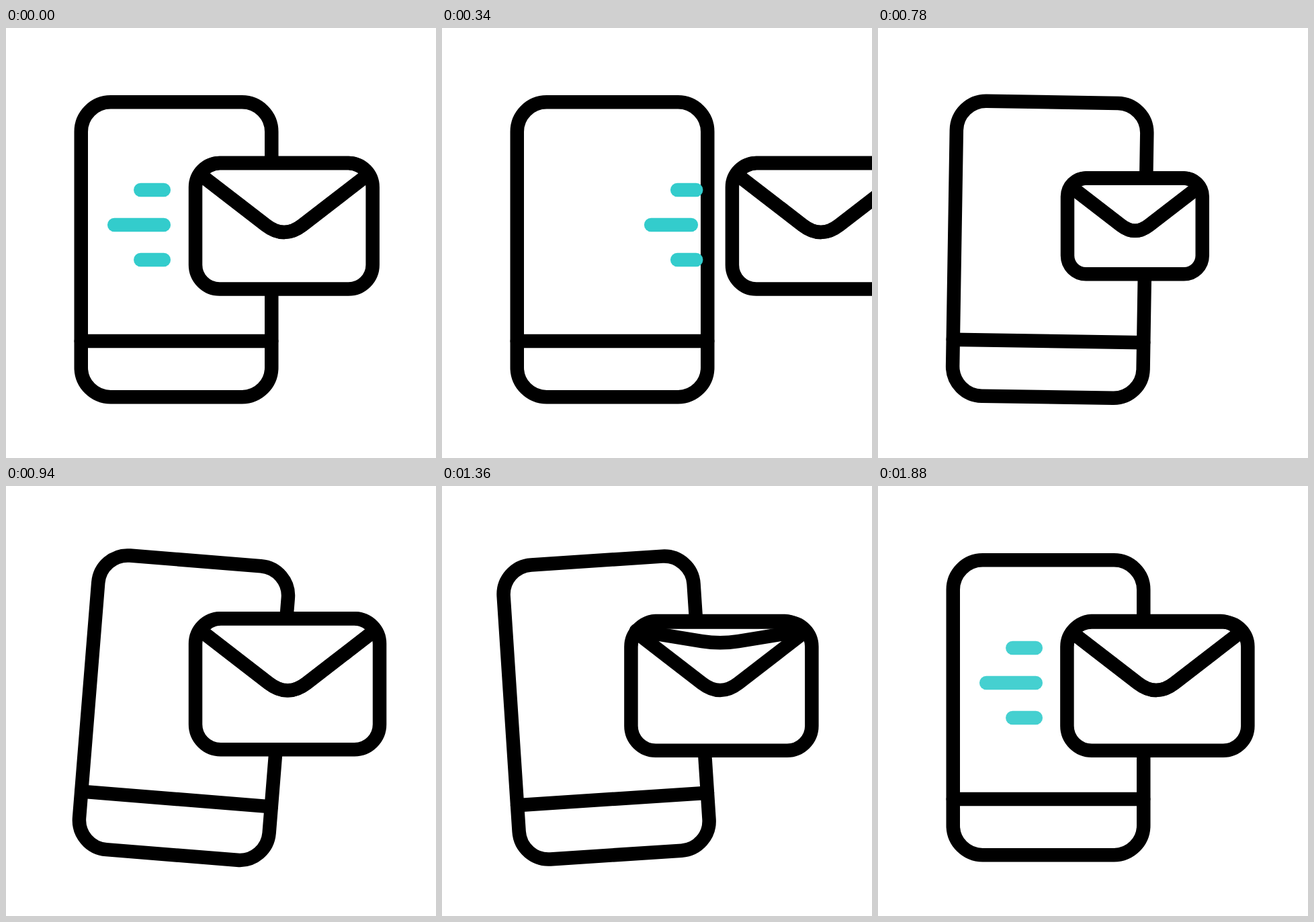
An HTML page for the animation above (2020 ms loop, 640 by 640 pixels).

```html
<!DOCTYPE html>
<html lang="en">
<head>
<meta charset="utf-8">
<title>Phone message</title>
<style>
  html, body { margin: 0; width: 100%; height: 100%; overflow: hidden; background: #fff; }
  svg { display: block; width: 640px; height: 640px; }
  svg * { vector-effect: non-scaling-stroke; }
  .ink { fill: none; stroke: #000; stroke-width: 20.5; stroke-linecap: round; stroke-linejoin: round; }
  .paper { fill: #fff; }
  #lines { stroke: #3cc; stroke-width: 20.5; stroke-linecap: round; }
</style>
</head>
<body>
<svg viewBox="0 0 640 640">
  <g id="phone" class="ink">
    <rect x="111.75" y="110.25" width="283.5" height="439" rx="44"/>
    <path d="M111.75 466H395.25"/>
  </g>
  <g id="lines">
    <line y1="241" y2="241"/>
    <line y1="293" y2="293"/>
    <line y1="345" y2="345"/>
  </g>
  <g id="mail" class="ink">
    <rect id="body" class="paper" x="282" y="201" width="263.7" height="187.6" rx="36"/>
    <path d="M289 218A36 36 0 0 1 318 201H510A36 36 0 0 1 539 218"/>
    <path d="M289 218L387 293.6Q414 314.4 441 293.6L539 218"/>
    <path id="lid" d="M289 218L387 293.6Q414 314.4 441 293.6L539 218"/>
  </g>
</svg>
<script>
  const LOOP = 2020, STEP = 20;
  const el = id => document.getElementById(id);
  const phone = el('phone'), lines = el('lines'), mail = el('mail');
  const body = el('body'), lid = el('lid');
  const starts = [200.3, 161.2, 200.3], lineEnd = 234.8;

  const clamp = v => Math.min(1, Math.max(0, v));
  const smooth = p => p * p * (3 - 2 * p);
  const easeOut = p => 1 - (1 - p) * (1 - p);

  // keys: [time, value], eased in and out between neighbours
  function track(keys, t) {
    let i = 1;
    while (i < keys.length - 1 && t > keys[i][0]) i++;
    const [t0, v0] = keys[i - 1], [t1, v1] = keys[i];
    return v0 + (v1 - v0) * smooth(clamp((t - t0) / (t1 - t0)));
  }

  const tilt = [[700, 0], [990, 5], [1200, -5], [1690, 0]];
  const lidScale = [[985, 1], [1295, 0.1], [1594, 1]];
  const settle = [[880, 1.053], [1060, 1]];
  const grow = [[940, 0], [1060, 1]];

  const scaleAt = (x, y, sx, sy) =>
    `translate(${x} ${y}) scale(${sx} ${sy}) translate(${-x} ${-y})`;

  function draw(t) {
    const leaving = t < 500, arriving = t >= 700;
    const shift = leaving ? 486 * Math.pow(t / 500, 3.05) : 0;

    phone.setAttribute('transform', `rotate(${track(tilt, t)} 253.5 466)`);

    const trim = 1 - shift / 800;
    [...lines.children].forEach((line, i) => {
      const x = starts[i] + shift;
      line.setAttribute('x1', x);
      line.setAttribute('x2', x + (lineEnd - starts[i]) * trim);
    });
    lines.setAttribute('opacity', leaving ? 1 : clamp((Math.min(t, 1880) - 1760) / 132));

    let size = 1;
    if (arriving) size = t < 880 ? 1.053 * easeOut(clamp((t - 690) / 190)) : track(settle, t);
    mail.style.display = leaving || arriving ? '' : 'none';
    mail.setAttribute('transform', `translate(${shift} 0) ${scaleAt(282, 294.8, size, size)}`);

    const g = leaving ? 0 : track(grow, t), bigger = 1 + 0.02 * g;
    body.setAttribute('transform',
      `translate(${-0.6 * g} ${3.3 * g}) ${scaleAt(282, 294.8, bigger, bigger)}`);
    lid.setAttribute('transform', scaleAt(0, 214.5, 1, track(lidScale, t)));
  }

  const origin = performance.now();
  function tick() {
    const t = (performance.now() - origin) % LOOP;
    draw(Math.floor(t / STEP) * STEP);
    requestAnimationFrame(tick);
  }
  tick();
</script>
</body>
</html>
```
